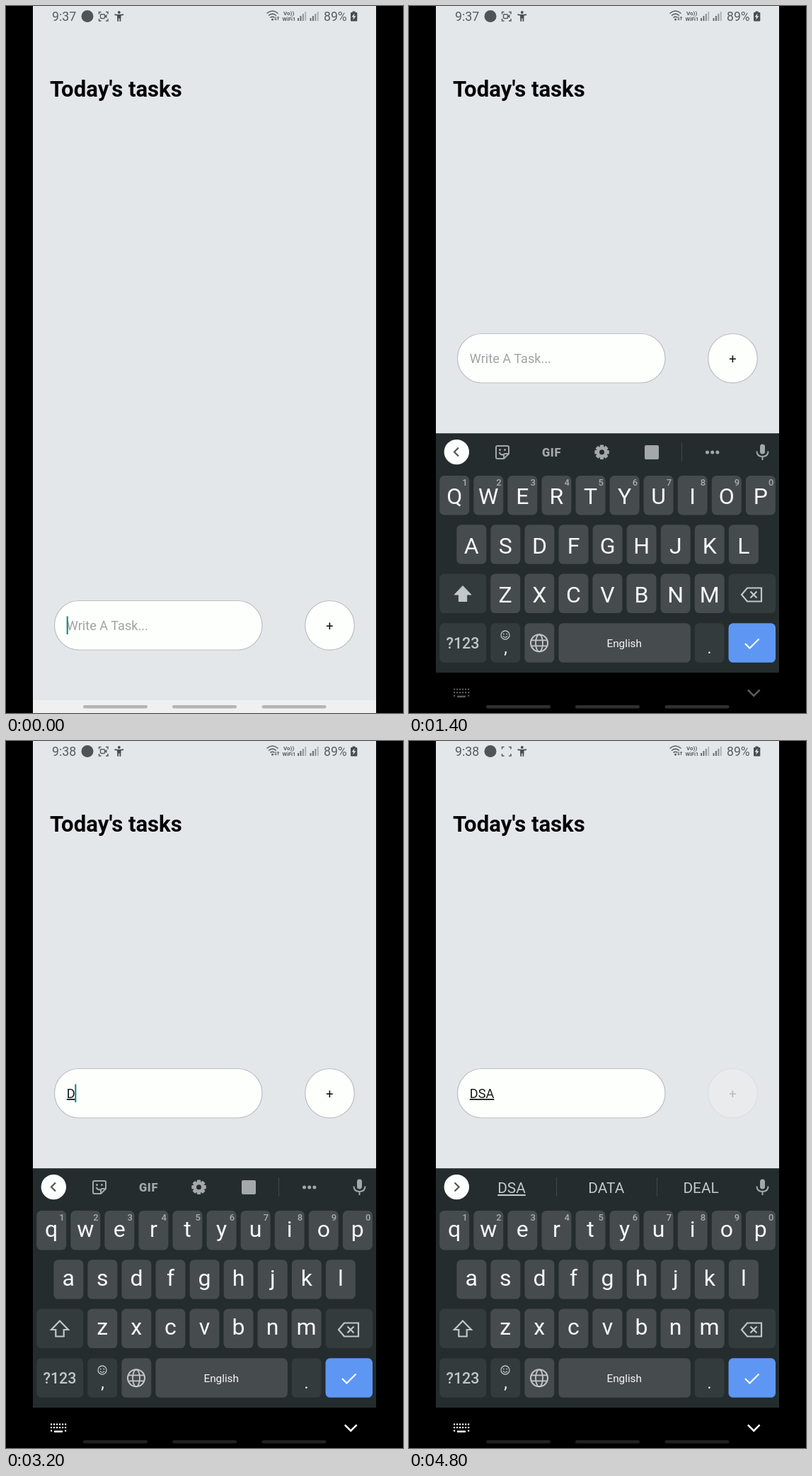
These frames come from a looping animation (561 px wide and 998 px high, 5000 ms). An HTML page:

```html
<!DOCTYPE html>
<html lang="en">
<head>
<meta charset="utf-8">
<title>Today's tasks</title>
<style>
html, body { margin: 0; width: 100%; height: 100%; overflow: hidden; background: #000; }
svg { display: block; font-family: Roboto, sans-serif; }
</style>
</head>
<body>
<svg id="stage" width="561" height="998" viewBox="0 0 561 998"></svg>
<script>
const LOOP = 5000, STEP = 200;
const stage = document.getElementById('stage');

const rect = (x, y, w, h, fill, r = 0, more = '') =>
  `<rect x="${x}" y="${y}" width="${w}" height="${h}" rx="${r}" fill="${fill}" ${more}/>`;
const circle = (x, y, r, fill, more = '') =>
  `<circle cx="${x}" cy="${y}" r="${r}" fill="${fill}" ${more}/>`;
const line = (d, color, width = 2, more = '') =>
  `<path d="${d}" fill="none" stroke="${color}" stroke-width="${width}" ${more}/>`;
const shape = (d, fill, more = '') => `<path d="${d}" fill="${fill}" ${more}/>`;
const text = (s, x, y, size, fill, more = '') =>
  `<text x="${x}" y="${y}" font-size="${size}" fill="${fill}" ${more}>${s}</text>`;
const MID = 'text-anchor="middle"', UNDER = 'text-decoration="underline"';

function statusBar(clock, recording) {
  const c = '#595d5f';
  const bars = x => [0, 1, 2, 3].map(i =>
    rect(x + i * 3.4, 17 - i * 3, 2, 4 + i * 3, i < 2 ? '#696d6f' : i < 3 ? '#8c9092' : '#b0b3b5')).join('');
  return text(clock, 65, 21, 17.8, c) + circle(115, 14.5, 8.5, '#505456') +
    line('M131.5 11.5v-3h3M141 8.500h3v3M144 18v3h-3M134.500 21h-3v-3', c, 1.5) +
    (recording ? rect(133.5, 11.7, 6, 5.8, 'none', 1, `stroke="${c}" stroke-width="1.400"`) +
      shape('M140 13.500l2.500-1.500v5l-2.500-1.500z', c) : '') +
    circle(159.800, 9, 1.9, '#484c4e') +
    line('M153.500 12.200q6.300 1.200 12.600 0M158.200 12.800v9M161.400 12.800v9', '#484c4e', 1.8) +
    shape('M157.300 12h5v5.500h-5z', '#484c4e') +
    line('M368.500 10.500q8-7 16 0M371 13.500q5.500-4.600 11 0M373.500 16.400q3-2.400 6 0', c, 1.6) +
    circle(376.500, 19, 1.5, c) + line('M381 15v5M384.500 20v-5M379.500 18.300l1.500 1.700 1.500-1.700M383 16.700l1.500-1.700 1.500 1.700', c, 1) +
    text('Vo))', 392, 13, 8, c, 'font-weight="700"') +
    text('WiFi1', 390.500, 21.300, 7.4, c, 'font-weight="700"') +
    bars(412) + bars(429.500) + text('89%', 449, 21, 17.6, c) +
    rect(489.500, 7.500, 4, 2, '#484c4e') + rect(487, 9, 9.300, 12.500, '#484c4e', 1) +
    shape('M492.500 10.500l-4 5h2.500l-.6 4 4-5.300h-2.500z', '#e4e7ea');
}

function entry(y, typed, caret, pressed) {
  const border = 'stroke="#bcbfc0" stroke-width="1.200"';
  const caretX = [85.700, 97.300, 108, 119.600][typed.length];
  return rect(68.500, y + .5, 293.500, 69.500, '#fdfffd', 34.700, border) +
    (typed ? text(typed, 85.800, y + 42, 18.14, '#161616', UNDER)
           : text('Write A Task...', 85.800, y + 42, 18.14, '#a0a3a2')) +
    (caret ? rect(caretX, y + 22.500, 2, 25.500, '#118279') : '') +
    `<g opacity="${pressed ? .2 : 1}">` + circle(457.500, y + 35.300, 34.800, '#fdfffd', border) +
    text('+', 457.500, y + 42, 18.14, '#111', MID) + '</g>';
}

function toolbar(words) {
  const c = '#a4a8aa';
  const mic = rect(496, 618.500, 7, 14, c, 3.500) +
    line('M491.500 628.500q0 7.500 8 7.500t8-7.500M499.500 636v5', c, 2);
  const toggle = circle(67.300, 629.600, 17.700, '#fdfffe') +
    line(words ? 'M64.500 623.500l6 6-6 6' : 'M70 623.500l-6 6 6 6', '#50585a', 2.200);
  if (words) return toggle + mic +
    words.map((w, i) => text(w, 145 + i * 133.800, 638, 20.800, '#c5c9ca', MID + (i ? '' : ' ' + UNDER))).join('') +
    rect(208, 616, 1, 27, '#414849') + rect(350, 616, 1, 27, '#414849');
  const teeth = [0, 1, 2, 3].map(i =>
    rect(269.800, 619.500, 5.400, 20.500, c, 1, `transform="rotate(${i * 45} 272.500 629.800)"`)).join('');
  return toggle + mic +
    line('M125 621h14q2 0 2 2v9l-7 7h-9q-2 0-2-2v-14q0-2 2-2zM141 632h-5q-2 0-2 2v5M127.500 630q2 4.500 6.500 3', c, 2) +
    circle(128.500, 626.500, 1.5, c) + circle(135.500, 626.500, 1.5, c) +
    text('GIF', 201.500, 635.500, 16.500, c, MID + ' font-weight="900" letter-spacing=".6"') +
    circle(272.500, 629.800, 7.900, c) + teeth + circle(272.500, 629.800, 3.500, '#242c2e') +
    rect(333, 620, 20, 20, c, 2) + rect(385, 616, 1, 27, '#414849') +
    [421.500, 428.700, 435.900].map(x => circle(x, 630, 2.500, c)).join('');
}

function keyboard(s) {
  const key = '#464b4d', side = '#333b3d', ink = '#f7f9f9', soft = '#c3c7c8';
  const box = (x, y, w, fill) => rect(x, y, w, 55.500, fill, 6.500);
  const rows = [['qwertyuiop', 43.200, 663], ['asdfghjkl', 67.300, 732.300], ['zxcvbnm', 115.200, 801.600]];
  let out = rect(38, 603.500, 485, 337.500, '#242c2e') + toolbar(s.words);
  let popup = '';
  for (const [letters, x0, y] of rows) {
    [...letters].forEach((ch, i) => {
      const x = x0 + i * 48.070, mid = x + 21;
      out += box(x, y, 42, key) +
        text(s.upper ? ch.toUpperCase() : ch, mid, y + (s.upper ? 40.300 : 36.500), 32, ink, MID);
      if (y === 663) out += text((i + 1) % 10, mid + 14.800, 677.300, 13, '#a9adaf', MID + ' font-weight="500"');
      if (ch === s.popup) popup = rect(x - 4, 663, 50, 125, '#5b6163', 7) +
        text(ch.toUpperCase(), mid, 711, 38, ink, MID);
    });
  }
  out += box(43.200, 801.600, 66, s.shift ? '#50585a' : side) + box(451.500, 801.600, 66.500, side) +
    shape('M76 818.500l-12 12.500h6.300v9.500h11.400v-9.500h6.300z', s.upper ? soft : 'none',
      `stroke="${soft}" stroke-width="${s.upper ? 1 : 2.200}"`) +
    line('M470 831l8-9.500h20v19h-20zM482.500 826.500l9 9M491.500 826.500l-9 9', soft, 2.200);
  const y = 871.300;
  out += box(43.200, y, 66, side) + box(115.200, y, 42, side) + box(163.300, y, 42, key) +
    box(211.400, y, 186.500, key) + box(403.600, y, 42, side) + box(451.500, y, 66.500, '#5e97f3') +
    text('?123', 76, 907.300, 21.500, soft, MID + ' font-weight="500"') +
    circle(136, 888, 6, 'none', `stroke="${soft}" stroke-width="1.300"`) +
    circle(133.800, 886.500, .9, soft) + circle(138.200, 886.500, .9, soft) +
    line('M133 889.500q3 3.500 6 0', soft, 1.200) +
    text(',', 136.500, 914, 23, ink, MID) + text('.', 424.500, 914, 23, ink, MID) +
    circle(184, 899.300, 12, 'none', `stroke="${soft}" stroke-width="2"`) +
    `<ellipse cx="184" cy="899.300" rx="5" ry="12" fill="none" stroke="${soft}" stroke-width="1.800"/>` +
    line('M173 895.300h22M173 903.300h22', soft, 1.800) +
    text('English', 304.200, 905, 15.300, ink, MID) +
    line('M475 900l6.500 6.500 13-13', '#fff', 2.200);
  return out + popup;
}

function navIcons(color) {
  let dots = '';
  for (let i = 0; i < 18; i++)
    if (i < 12 || i % 6 === 0 || i % 6 === 5)
      dots += rect(63 + i % 6 * 4, 963.500 + Math.floor(i / 6) * 4.500, 2.200, 2.200, color);
  return dots + rect(68, 973.500, 12, 2.500, color) + line('M478.800 965.300l8.400 8.400 8.400-8.400', color, 2.500);
}

const pills = color => [109, 235, 361.500].map(x => rect(x, 987, 91, 4.500, color, 2.200)).join('');

function draw(t) {
  const on = (...flips) => flips.filter(f => t >= f).length % 2 === 0;
  const typed = 'DSA'.slice(0, t < 3200 ? 0 : t < 3800 ? 1 : t < 4200 ? 2 : 3);
  const open = t >= 1200, sliding = open && t < 1400;
  const caret = on(400, 800, 1400, 1800, 2400, 2800, 3600, 3800, 4800);
  const recording = on(600, 1000, 1600, 2000, 2600, 3200, 3600, 4000, 4600);
  let out = rect(0, 0, 561, 998, '#000') + rect(38, 0, 485, 998, '#e4e7ea') +
    statusBar(t < 2800 ? '9:37' : '9:38', recording) +
    text("Today's tasks", 62, 128, 31.1, '#050505', 'font-weight="700"') +
    entry(open ? 462 : 839, typed, caret, t >= 4800);
  if (open) {
    const board = keyboard({
      words: [, , ['DS', 'SS', 'DATA'], ['DSA', 'DATA', 'DEAL']][typed.length],
      upper: on(2400, 2800, 3200, 3400, 4200),
      shift: !on(2200, 2400, 3400, 3600, 3800, 4000),
      popup: t >= 3000 && t < 3200 ? 'd' : t >= 3600 && t < 3800 ? 's' : ''
    });
    out += rect(38, 603.500, 485, 394.500, sliding ? '#fdfffd' : '#000') +
      (sliding ? `<g opacity=".62" transform="translate(0 64)">${board}</g>` : board);
  } else {
    out += rect(38, 980, 485, 18, '#f0f0f0');
  }
  out += pills(!open ? '#b5b5b5' : sliding ? 'rgba(0,0,0,.09)' : t < 1800 ? '#303030' : '#212121');
  // Navigation icons brighten once the bar turns black.
  const level = sliding ? 45 : Math.min(255, Math.round(64 + Math.max(0, t - 1200) / 1400 * 191));
  if (t >= 1000) out += navIcons(`rgb(${level},${level},${level})`);
  stage.innerHTML = out;
}

let shown = -1;
function tick() {
  const step = Math.floor(performance.now() % LOOP / STEP);
  if (step !== shown) draw((shown = step) * STEP);
  requestAnimationFrame(tick);
}
tick();
</script>
</body>
</html>
```
